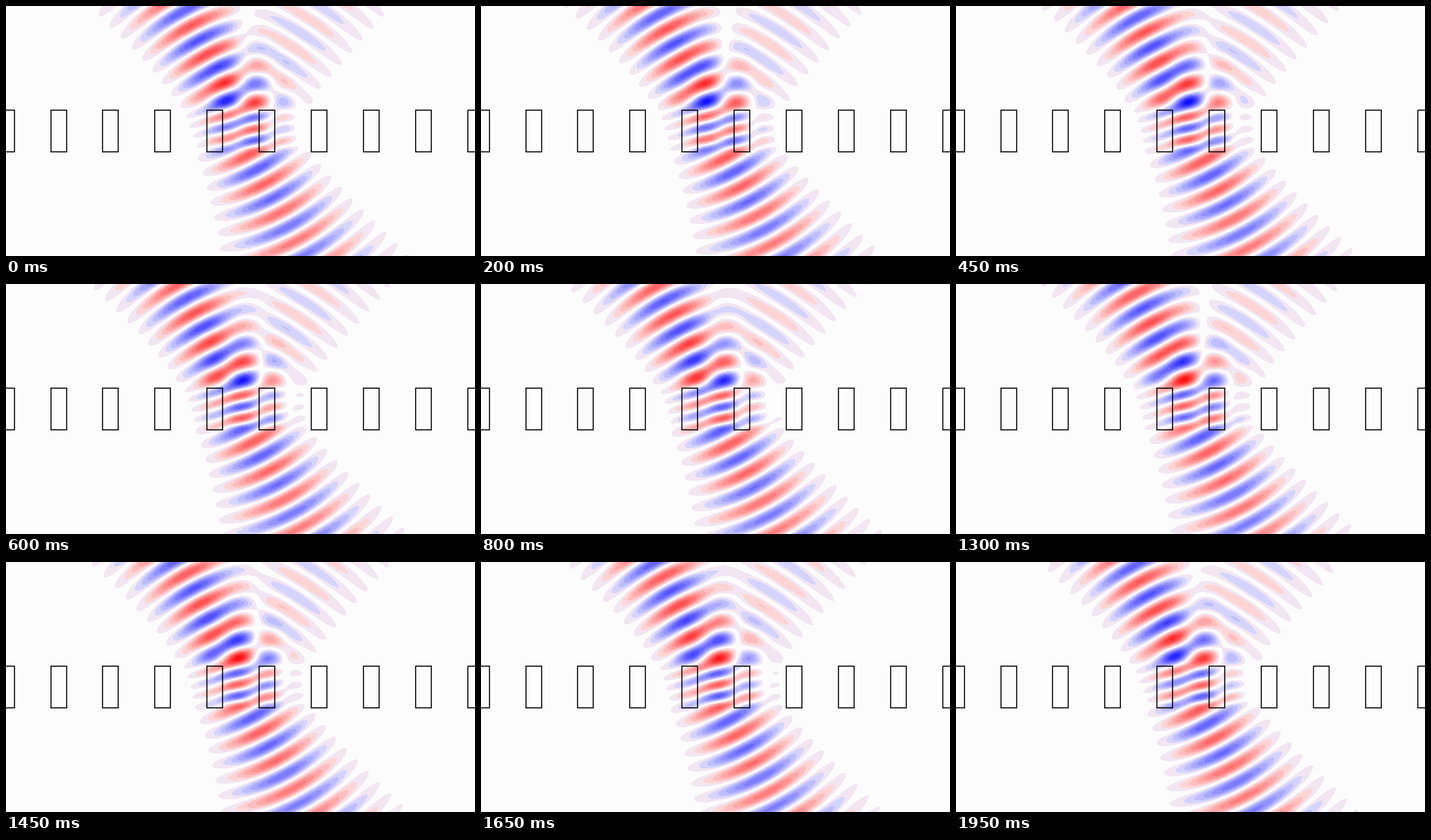
Recreate the animation shown at these times as a matplotlib script. Size 719x384 px, loop 2 s.

```python
import numpy as np
import matplotlib.pyplot as plt
from matplotlib.animation import FuncAnimation
from matplotlib.patches import Rectangle

W, H, DPI = 719, 384, 128
FRAMES, INTERVAL = 40, 50

WAVELENGTH = 49.5
INDEX = 1.5                      # slab refractive index
TOP, BOTTOM = 159.5, 223.5       # slab faces
ANGLE = np.radians(28)
WAIST = 50.0
ENTRY_X = 352.0                  # where the beam axis meets the slab
FOCUS = 25.0                     # waist distance before the slab
STEP = 0.085
PERIOD = W / 9                   # spacing of the bars


def beam_field():
    """Complex field of a Gaussian beam crossing a slab, as a sum of plane waves."""
    k = 2 * np.pi / WAVELENGTH
    spread = WAVELENGTH / (np.pi * WAIST)
    theta = np.linspace(ANGLE - 3 * spread, min(ANGLE + 3 * spread, 1.4), 181)
    weight = np.exp(-((theta - ANGLE) / spread) ** 2)
    kx, ky = k * np.sin(theta), k * np.cos(theta)
    ks = np.sqrt((INDEX * k) ** 2 - kx ** 2)

    # Reflection and transmission of the slab for each plane wave
    rho = (ky - ks) / (ky + ks)
    hop = np.exp(1j * ks * (BOTTOM - TOP))
    down = (1 + rho) / (1 - (rho * hop) ** 2)
    up = -down * rho * hop ** 2
    refl = rho * (1 - hop ** 2) / (1 - (rho * hop) ** 2)
    trans = down * (1 - rho) * hop

    x = np.arange(W) + 0.5
    y = (np.arange(H) + 0.5)[:, None]
    xf = ENTRY_X - FOCUS * np.sin(ANGLE)
    yf = TOP - FOCUS * np.cos(ANGLE)

    above = np.exp(1j * ky * (y - TOP)) + refl * np.exp(-1j * ky * (y - TOP))
    inside = down * np.exp(1j * ks * (y - TOP)) + up * np.exp(-1j * ks * (y - TOP))
    below = trans * np.exp(1j * ky * (y - BOTTOM))
    column = np.where(y < TOP, above, np.where(y < BOTTOM, inside, below))
    column = column * weight * np.exp(1j * ky * (TOP - yf))
    field = column @ np.exp(1j * np.outer(kx, x - xf))

    field /= np.abs(field).max()
    anchor = field[148, 384]     # a crest passes here at time zero
    return field * np.conj(anchor) / abs(anchor)


def make_palette():
    """Blue to white to red in flat steps, with a shared pale tint near zero."""
    n = 11
    colors = np.full((2 * n + 1, 3), 252, dtype=np.uint8)
    for i in range(1, n + 1):
        fade = round(255 * (1 - min(1, i * STEP)))
        colors[n + i] = (255, fade, fade)
        colors[n - i] = (fade, fade, 255)
    colors[n - 1] = colors[n + 1] = (242, 230, 242)
    return colors


def paint(frame):
    v = np.real(FIELD * np.exp(-2j * np.pi * frame / FRAMES))
    level = np.clip(np.floor(np.abs(v) / STEP), 0, 11).astype(int)
    return PALETTE[11 + np.sign(v).astype(int) * level]


FIELD = beam_field()
PALETTE = make_palette()

fig = plt.figure(figsize=(W / DPI, H / DPI), dpi=DPI)
ax = fig.add_axes([0, 0, 1, 1])
ax.axis("off")
image = ax.imshow(paint(0), extent=(0, W, H, 0), interpolation="nearest", aspect="auto")
for i in range(10):
    left = 68.6 + (i - 1) * PERIOD
    ax.add_patch(Rectangle((left, TOP), 0.3 * PERIOD, BOTTOM - TOP, fill=False,
                           edgecolor="black", linewidth=1.6 * 72 / DPI))
ax.set_xlim(0, W)
ax.set_ylim(H, 0)


def update(frame):
    image.set_data(paint(frame))
    return [image]


anim = FuncAnimation(fig, update, frames=FRAMES, interval=INTERVAL,
                     repeat=True, repeat_delay=0)
plt.show()
```
